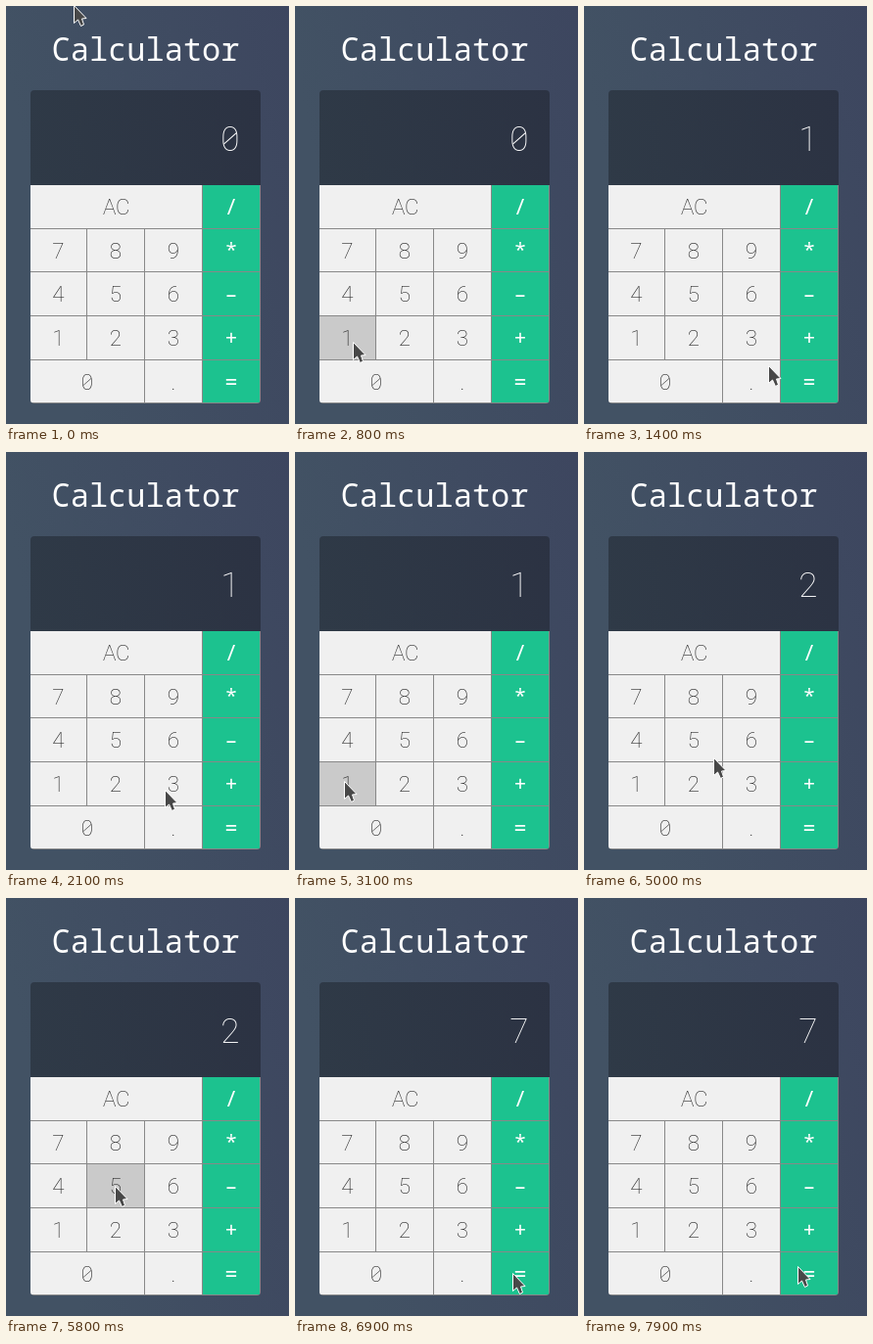
Animation, 289 px wide and 427 px high, one loop 8000 ms. Source, as an HTML page with a canvas:

```html
<!DOCTYPE html>
<html>
<head>
<meta charset="utf-8">
<title>Calculator</title>
<style>
html, body { margin: 0; height: 100%; overflow: hidden; background: #404b62; }
canvas { display: block; width: 289px; height: 427px; }
</style>
</head>
<body>
<canvas id="stage" width="289" height="427"></canvas>
<script>
const ctx = document.getElementById('stage').getContext('2d');
const LOOP = 8000, STEP = 100, HOLD = 200;
const MONO = '"Noto Sans Mono", monospace';
const THIN = 'Roboto, sans-serif';
const colX = c => Math.floor(25 + 58.75 * c);
const rowY = r => Math.round(183.2 + 44.6 * r);

// a repeated label widens its key
const layout = [
  ['AC', 'AC', 'AC', '/'],
  ['7', '8', '9', '*'],
  ['4', '5', '6', '–'],
  ['1', '2', '3', '+'],
  ['0', '0', '.', '=']
];

// press time, key, display after release
const clicks = [
  [800, '1', '1'], [1900, '+', '1'], [3000, '1', '1'],
  [3900, '+', '2'], [5800, '5', '5'], [6700, '=', '7']
];

// pointer moves: start, end, x, y, sideways bow
const moves = [
  [0, 600, 59, 343, 58], [900, 1800, 220, 344, -24], [2000, 2400, 87, 346, 0],
  [2600, 2700, 50, 336, 0], [3200, 3800, 221, 342, -12], [4300, 5400, 119, 308, 0],
  [5500, 5700, 111, 294, 0], [6000, 6500, 222, 383, 0], [7700, 7900, 218, 376, 0]
];

function gradient(from, to) {
  const g = ctx.createLinearGradient(0, 60, 289, 0);
  g.addColorStop(0, from);
  g.addColorStop(1, to);
  return g;
}

function rect(x0, y0, x1, y1, color) {
  ctx.fillStyle = color;
  ctx.fillRect(x0, y0, x1 - x0, y1 - y0);
}

function text(s, x, y, font, color) {
  ctx.font = font;
  ctx.fillStyle = color;
  ctx.fillText(s, x, y);
}

// thin fixed-pitch characters with a slashed zero
function thinText(s, x, y, size, color) {
  [...s].forEach((ch, i) => {
    const cx = x + (i - (s.length - 1) / 2) * size * 0.6;
    text(ch, cx, y, `100 ${size}px ${THIN}`, color);
    if (ch !== '0') return;
    ctx.beginPath();
    ctx.moveTo(cx - size * 0.18, y - size * 0.2);
    ctx.lineTo(cx + size * 0.18, y - size * 0.52);
    ctx.lineWidth = size / 35;
    ctx.strokeStyle = color;
    ctx.stroke();
  });
}

function drawKey(label, r, c0, c1, pressed) {
  const isOp = c0 === 3;
  const x0 = colX(c0), x1 = colX(c1), y0 = rowY(r), y1 = rowY(r + 1);
  rect(x0, y0, x1, y1, '#888');
  const fill = isOp ? (pressed ? '#18a578' : '#1cc28f') : (pressed ? '#cacaca' : '#f0f0f0');
  rect(x0, y0, x1 - 1, y1 - 1, fill);
  const x = (x0 + x1 - 1) / 2, y = Math.floor((y0 + y1) / 2 + 8);
  if (isOp) text(label, x, y, `22.4px ${MONO}`, '#fff');
  else thinText(label, x, y, 22.4, '#222');
}

function drawPointer(x, y) {
  ctx.save();
  ctx.translate(x + 0.5, y + 0.5);
  ctx.beginPath();
  [[0, 0], [0, 18], [4, 14.5], [7, 21], [10, 19.5], [8, 13.5], [12.5, 13]]
    .forEach(p => ctx.lineTo(...p));
  ctx.closePath();
  ctx.fillStyle = '#484848';
  ctx.strokeStyle = '#fff';
  ctx.lineWidth = 1;
  ctx.fill();
  ctx.stroke();
  ctx.restore();
}

function pointerAt(t) {
  let x = 69, y = -1;
  for (const [start, end, toX, toY, bow] of moves) {
    if (t < start) break;
    const p = Math.min(1, (t - start) / (end - start));
    const ease = 1 - (1 - p) ** 2;
    const dx = toX - x, dy = toY - y;
    const side = bow * Math.sin(Math.PI * p) / Math.hypot(dx, dy);
    x += dx * ease + dy * side;
    y += dy * ease - dx * side;
  }
  return [Math.round(x), Math.round(y)];
}

function draw(t) {
  const held = clicks.find(([at]) => t >= at && t < at + HOLD);
  const done = clicks.filter(([at]) => t >= at + HOLD).pop();

  rect(0, 0, 289, 427, gradient('#425264', '#3d465f'));
  ctx.textAlign = 'center';
  text('Calculator', 142.5, 56, `300 32px ${MONO}`, '#fff');

  ctx.save();
  ctx.beginPath();
  ctx.roundRect(25, 86, 235, 320, 4);
  ctx.clip();
  rect(25, 86, 260, 183, gradient('#2f3a47', '#2b3142'));
  thinText(done ? done[2] : '0', 229, 148, 35.2, '#fff');
  layout.forEach((row, r) => row.forEach((label, c) => {
    if (row.indexOf(label) === c)
      drawKey(label, r, c, row.lastIndexOf(label) + 1, held && held[1] === label);
  }));
  ctx.restore();

  drawPointer(...pointerAt(t));
}

const start = performance.now();
function tick() {
  const t = (performance.now() - start) % LOOP;
  draw(Math.floor(t / STEP) * STEP);
  requestAnimationFrame(tick);
}
tick();
</script>
</body>
</html>
```
